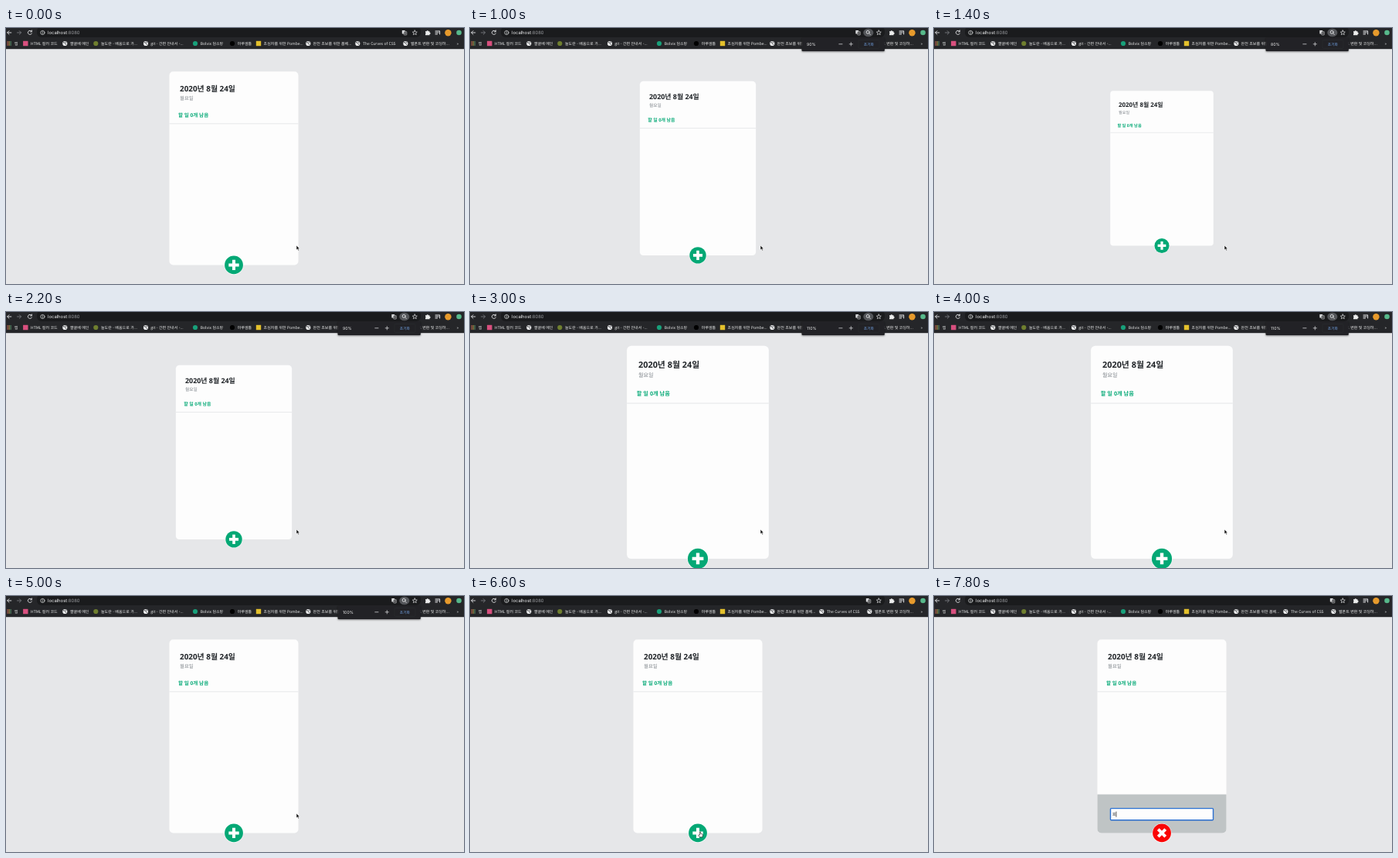
An HTML page for the animation above (8 s loop, 593 by 331 pixels).

```html
<!DOCTYPE html>
<html lang="ko">
<head>
<meta charset="utf-8">
<title>Todo zoom</title>
<style>
  html, body { margin: 0; width: 100%; height: 100%; overflow: hidden; background: #e6e7e9; }
  svg { display: block; width: 100vw; height: 100vh; }
  text { font-family: "Noto Sans", "Noto Sans CJK KR", sans-serif; text-rendering: geometricPrecision; white-space: pre; }
  .ui text { font-family: Inter, "Noto Sans CJK KR", sans-serif; }
  .marks text { font-family: "Noto Sans CJK KR", sans-serif; font-size: 5px; font-weight: 500; fill: #eceded; }
  .line { fill: none; stroke: #e4e5e7; stroke-width: .9; stroke-linecap: round; stroke-linejoin: round; }
</style>
</head>
<body>
<svg viewBox="0 0 593 331" preserveAspectRatio="none">
  <defs>
    <filter id="shade" x="-10%" y="-20%" width="120%" height="160%">
      <feDropShadow dx="0" dy="1" stdDeviation="1.2" flood-opacity=".45"/>
    </filter>
    <g id="globe">
      <circle r="3.1" fill="#eeeff0"/>
      <path d="M-2.3-1 Q-1-1.9 0-.7 T1.2 1.6 M.6-2.4 L1.9-.9" fill="none" stroke="#292a2d" stroke-width=".9"/>
    </g>
  </defs>

  <rect y="26" width="593" height="305" fill="#e6e7e9"/>

  <g id="todo">
    <rect x="211.5" y="56.3" width="167" height="250.2" rx="5" fill="#fdfdfd"/>
    <text x="225" y="81.8" font-size="9.9" font-weight="700" fill="#202428">2020년 8월 24일</text>
    <text x="225" y="92.8" font-size="6.4" fill="#7c8288">월요일</text>
    <text x="223" y="114.6" font-size="6.6" font-weight="700" fill="#0aab79">할 일 0개 남음</text>
    <path d="M211.5 123.8H378.5" stroke="#e4e6e8" stroke-width=".9"/>
    <g id="form">
      <path d="M211.5 256.5h167v45a5 5 0 0 1-5 5h-157a5 5 0 0 1-5-5z" fill="#bfc4c5"/>
      <rect x="228.5" y="274.6" width="133" height="15.2" rx="1" fill="#fdfdfd" stroke="#2a6fd0" stroke-width="1.4"/>
      <text id="typed" x="230.7" y="284.2" font-size="5.2" fill="#202428"></text>
      <path id="caret" d="M0 278.7v7" stroke="#111" stroke-width=".7"/>
    </g>
    <g id="button">
      <circle r="12.4" fill="#fff"/>
      <circle id="disc" r="11.9"/>
      <path d="M-6.7 0H6.7M0-6.7V6.7" stroke="#fff" stroke-width="4"/>
    </g>
  </g>

  <g id="notice">
    <rect y="26" width="593" height="305" fill="#fefefe"/>
    <text x="147.5" y="176.6" font-size="11.9" font-weight="700" fill="#0b0b0b">440px X 730px 이상의 device 환경에서 사용해주세요.</text>
    <text x="195.5" y="197.7" font-size="7.6" fill="#111">Please use it in environment of 440px X 730px or larger.</text>
    <g transform="translate(435.5 173) rotate(8)" fill="none" stroke="#f9b92e" stroke-width="2.2" stroke-linecap="round">
      <path d="M-3.3 1L-4-4.2M-1.2 0L-1.4-6.2M1.1 0L1.3-6.2M3.2 1L3.9-4.4M3 4L6.2-.3"/>
      <path d="M-3.4 0H3.4V2.5Q2.7 5.6 0 5.6T-3.4 2.5Z" fill="#f9b92e" stroke-width="1.6"/>
    </g>
  </g>

  <g class="ui">
    <rect width="593" height="27.2" fill="#252629"/>
    <rect x="40" y="-2" width="497" height="14" rx="6" fill="#1a1b1d"/>
    <g class="line">
      <path d="M6.8 6H1.8M4 3.7L1.7 6L4 8.3"/>
      <path d="M14.5 6H19.5M17.3 3.7L19.6 6L17.3 8.3" stroke="#77797d"/>
      <path d="M33 4.2A2.6 2.6 0 1 0 33.4 7M33.4 3V4.9H31.5"/>
      <circle cx="47.4" cy="6" r="2.6" stroke-width=".7"/>
      <path d="M47.4 5.8V7.3M47.4 4.5V4.6" stroke-width=".7"/>
      <path d="M529.3 3L530.2 5L532.3 5.2L530.7 6.6L531.2 8.7L529.3 7.6L527.4 8.7L527.9 6.6L526.3 5.2L528.4 5Z" stroke-width=".7"/>
      <path d="M556 4H561.5M556 6H560M556 8H558.5M561.6 4.5V8" stroke-width="1"/>
    </g>
    <path d="M543 4.3h1.7a1.1 1.1 0 0 1 2.2 0h1.6v1.5a1.1 1.1 0 0 1 0 2.2v1.3H543V7.5a1 1 0 0 0 0-1.8z" fill="#eceded"/>
    <circle cx="572.4" cy="6.2" r="4.2" fill="#e79a2c"/>
    <circle cx="586.5" cy="6" r="3.3" fill="#57b98b"/>
    <text x="54" y="8.2" font-size="5.9" fill="#f1f2f3">localhost<tspan fill="#9a9ca0">:8080</tspan></text>
    <g id="translate">
      <rect x="-3" y="-3" width="3.8" height="4.4" rx=".5" fill="#d9dadc"/>
      <rect x="-.6" y="-1.4" width="3.6" height="4.4" rx=".5" fill="#1a1b1d" stroke="#d9dadc" stroke-width=".6"/>
      <path d="M.2 0H2.4M1.3-.6V0Q1 1.5 .2 2M.7.8L2.2 2" fill="none" stroke="#d9dadc" stroke-width=".45"/>
    </g>
    <g id="marks" class="marks"></g>

    <g id="bubble">
      <ellipse cx="515.8" cy="6" rx="6.6" ry="5.2" fill="#54565a"/>
      <g class="line" stroke-width=".8">
        <circle cx="515.2" cy="5.4" r="2"/>
        <path d="M516.7 6.9L518.3 8.5"/>
      </g>
      <rect x="429.5" y="12" width="107.3" height="18" rx="1.2" fill="#222326" filter="url(#shade)"/>
      <rect x="503" y="15.3" width="27" height="11" rx="1.5" fill="none" stroke="#2d2f32" stroke-width=".6"/>
      <text id="level" x="436" y="22.7" font-size="5.2" fill="#eceded"></text>
      <path d="M477.4 20.8H482.4M490.8 20.8H495.8M493.3 18.3V23.3" stroke="#cfd0d2" stroke-width=".8"/>
      <text x="509.8" y="22.6" font-size="4.8" fill="#76a9ee">초기화</text>
    </g>
  </g>

  <g id="cursor" stroke="#fff" stroke-width=".6" stroke-linejoin="round">
    <path id="arrow" d="M0 0V6L1.4 4.8L2.4 7L3.4 6.5L2.5 4.4H4.2Z" fill="#0a0a0a"/>
    <path id="hand" d="M-.6 0Q0-.8 .6 0V2.3L3 2.9Q3.7 3.2 3.5 4L2.9 6.8H-.6L-2.4 4.4Q-2 3.4-.6 4.2Z" fill="#fff" stroke="#111"/>
  </g>
</svg>

<script>
const $ = id => document.getElementById(id);
const LOOP = 8000, TICK = 200;

// Each table holds [start time, value]; values switch hard.
const zoomSteps = [[0, 100], [1000, 90], [1200, 80], [2000, 90], [2400, 100], [2800, 110], [3200, 125], [4000, 110], [4200, 100]];
const typedSteps = [[0, ""], [7600, "ㅎ"], [7800, "호"]];
const cursorPath = [[6000, 376, 281], [6200, 362, 287], [6400, 327, 299], [6600, 298, 305]];
const OPEN = 6800, BUBBLE_ON = 1000, BUBBLE_OFF = 5800, HIDE_CURSOR = 7600;

const at = (steps, t) => steps.filter(s => s[0] <= t).pop() || steps[0];
const show = (id, on) => $(id).setAttribute("visibility", on ? "visible" : "hidden");
const set = (id, name, value) => $(id).setAttribute(name, value);

// [icon x, text x, label, icon shape, colour]
const bookmarks = [
  [25.3, 32, "HTML 컬러 코드", "square", "#d9507f"],
  [76.3, 83, "쨜귤베 메인", "globe"],
  [116.3, 123, "늘도란 - 배움으로 가...", "circle", "#6f7f2f"],
  [181, 187.3, "git - 간편 안내서 -...", "globe"],
  [245, 251.8, "Bolvix 담소방", "circle", "#18a07a"],
  [293, 299.8, "마루셈틀", "circle", "#000"],
  [327, 333.6, "초심자를 위한 Pombe...", "square", "#e3c02c"],
  [391.3, 397.6, "완전 초보를 위한 폼베...", "globe"],
  [455.3, 462, "The Curves of CSS", "globe"],
  [517.3, 524, "웹폰트 변환 및 코딩하...", "globe"]
];

const icons = {
  globe: x => `<use href="#globe" x="${x}" y="20"/>`,
  circle: (x, c) => `<circle cx="${x}" cy="20" r="3.1" fill="${c}"/>`,
  square: (x, c) => `<rect x="${x - 3.2}" y="16.8" width="6.4" height="6.4" fill="${c}"/>`
};

let markup = '<text x="10.8" y="21.9">앱</text><text x="583.5" y="21.9">»</text>';
for (let i = 0; i < 9; i++) {
  markup += `<rect x="${1.5 + i % 3 * 2}" y="${17.3 + Math.floor(i / 3) * 2}" width="1.3" height="1.3" fill="${["#d96b5c", "#d6b24d", "#63a777"][i % 3]}"/>`;
}
for (const [iconX, textX, label, shape, colour] of bookmarks) {
  markup += icons[shape](iconX, colour) + `<text x="${textX}" y="21.9">${label}</text>`;
}
$("marks").innerHTML = markup;

function render(t) {
  const zoom = at(zoomSteps, t)[1];
  const typed = at(typedSteps, t)[1];
  const [, x, y] = at(cursorPath, t);
  const open = t >= OPEN;
  const bubble = t >= BUBBLE_ON && t < BUBBLE_OFF;
  const hover = t >= 6600;

  set("todo", "transform", `translate(295 181.4) scale(${zoom / 100}) translate(-295 -181.4)`);
  show("notice", zoom > 110);
  show("bubble", bubble);
  $("level").textContent = zoom + "%";
  set("translate", "transform", `translate(${bubble ? 502.3 : 515.8} 6)`);

  show("form", open);
  set("button", "transform", `translate(295 306.4) rotate(${open ? 45 : 0})`);
  set("disc", "fill", open ? "#fa0505" : "#04a875");
  $("typed").textContent = typed;
  set("caret", "transform", `translate(${typed ? 235.9 : 231} 0)`);

  set("cursor", "transform", `translate(${x} ${y})`);
  set("cursor", "display", t < HIDE_CURSOR ? "inline" : "none");
  show("arrow", !hover);
  show("hand", hover);
}

const start = performance.now();
function frame() {
  const t = (performance.now() - start) % LOOP;
  render(Math.floor(t / TICK) * TICK);
  requestAnimationFrame(frame);
}
frame();
</script>
</body>
</html>
```
